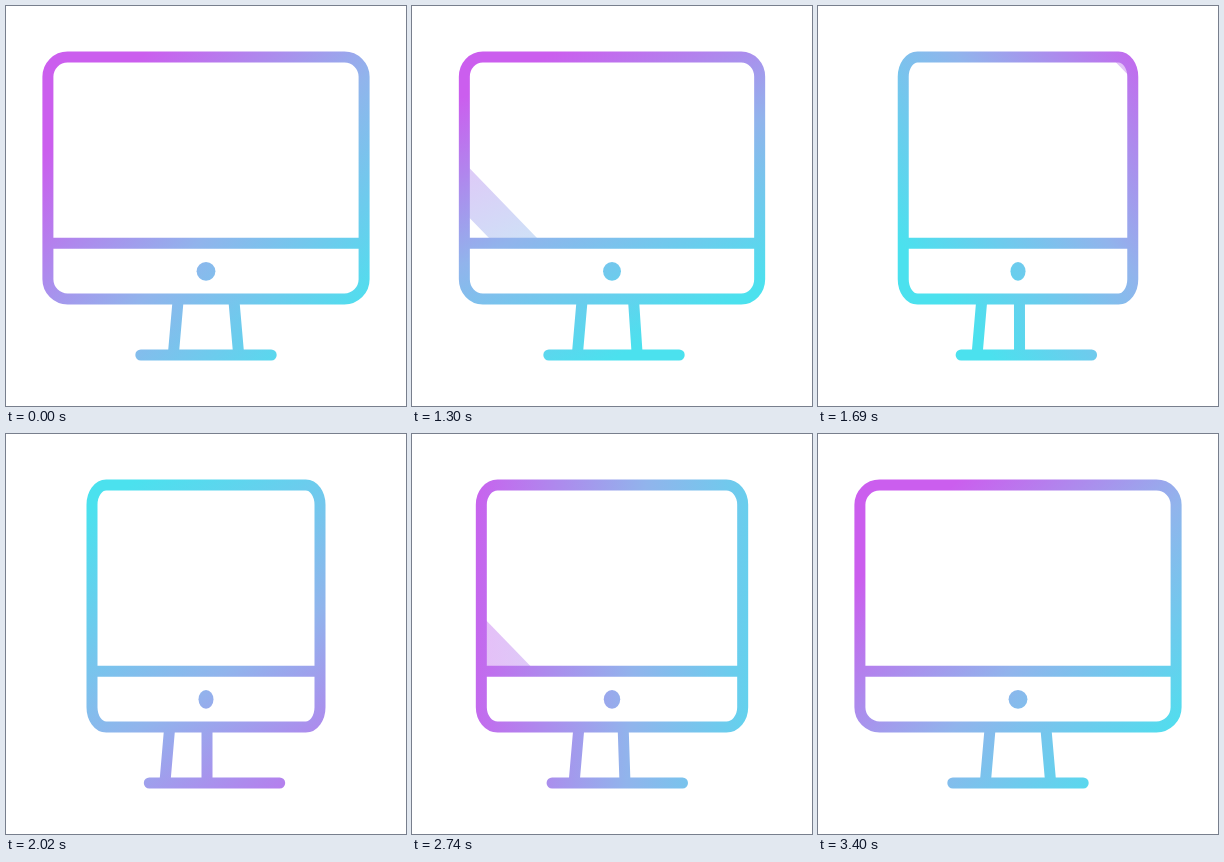
An HTML page for the animation above (3.43 s loop, 400 px wide and 400 px high).

```html
<!DOCTYPE html>
<html lang="en">
<head>
<meta charset="utf-8">
<title>Desktop monitor</title>
<style>
  html, body { margin: 0; width: 100%; height: 100%; overflow: hidden; background: #fff; }
  svg { display: block; width: 100vw; height: 100vh; }
</style>
</head>
<body>
<svg viewBox="0 0 400 400">
  <defs>
    <linearGradient id="tint" gradientUnits="userSpaceOnUse">
      <stop offset="0" stop-color="#cb5eee"/>
      <stop offset=".5" stop-color="#91b4ec"/>
      <stop offset="1" stop-color="#4be1ee"/>
    </linearGradient>
    <clipPath id="screen"><rect id="mask" y="51" height="186" ry="19.7"/></clipPath>
  </defs>
  <path id="gloss" clip-path="url(#screen)" fill="url(#tint)" opacity=".43"/>
  <g fill="none" stroke="url(#tint)" stroke-width="11">
    <rect id="frame" y="51" height="242" ry="19.7"/>
    <path id="lines"/>
    <path id="base" stroke-linecap="round"/>
  </g>
  <ellipse id="dot" cx="200" cy="265.3" ry="9.4" fill="url(#tint)"/>
</svg>
<script>
const LOOP = 3430, STEP = 30, START = 1030;
const el = id => document.getElementById(id);
const set = (id, attrs) => {
  for (const k in attrs) el(id).setAttribute(k, attrs[k]);
};
const mix = (a, b, p) => a + (b - a) * p;

// cubic-bezier(.6, 0, .4, 1)
function ease(x) {
  if (x <= 0) return 0;
  if (x >= 1) return 1;
  let lo = 0, hi = 1, u = 0.5;
  for (let i = 0; i < 24; i++) {
    u = (lo + hi) / 2;
    const v = 1 - u;
    if (1.8 * u * v * v + 1.2 * u * u * v + u * u * u < x) lo = u; else hi = u;
  }
  return u * u * (3 - 2 * u);
}
const span = (t, from, to) => ease((t - from) / (to - from));

// time, angle toward the purple end, value at the centre, length
const KEYS = [
  [1000, 225, 0.38, 345],
  [1510, 277, 0.53, 285],
  [2020, 417, 0.66, 420],
  [2500, 513, 0.47, 355],
  [2920, 560, 0.41, 365],
  [3400, 585, 0.38, 345]
];

function slope(i, c) {
  const a = KEYS[i - 1], b = KEYS[i + 1];
  return a && b ? (b[c] - a[c]) / (b[0] - a[0]) : 0;
}

function track(t, c) {
  const last = KEYS.length - 1;
  if (t <= KEYS[0][0]) return KEYS[0][c];
  if (t >= KEYS[last][0]) return KEYS[last][c];
  let i = 0;
  while (t >= KEYS[i + 1][0]) i++;
  const a = KEYS[i], b = KEYS[i + 1], d = b[0] - a[0];
  const u = (t - a[0]) / d, v = 1 - u;
  return a[c] * v * v * (1 + 2 * u) + b[c] * u * u * (3 - 2 * u)
    + d * u * v * (v * slope(i, c) - u * slope(i + 1, c));
}

function paintTint(t) {
  const a = track(t, 1) * Math.PI / 180, mid = track(t, 2), len = track(t, 3);
  const dx = -Math.cos(a) * len, dy = -Math.sin(a) * len;
  set("tint", {
    x1: 200 - dx * mid, y1: 171 - dy * mid,
    x2: 200 + dx * (1 - mid), y2: 171 + dy * (1 - mid)
  });
}

// Slanted band; l and r are its edges at y = 57
const band = (l, r) => `M${l - 6} 51H${r - 6}L${r + 174} 237H${l + 174}Z`;

function draw(t) {
  const turn = span(t, 1000, 1790) - span(t, 2200, 3400);
  const half = mix(158.1, 114, turn), left = 200 - half;
  const box = { x: left, width: half * 2, rx: 19.7 * half / 158.1 };
  set("frame", box);
  set("mask", box);
  set("dot", { rx: mix(9.4, 7.5, turn) });

  const pole = (top, foot, topTurn, footTurn) =>
    `M${mix(top, topTurn, turn)} 293L${mix(foot, footTurn, turn)} 349`;
  set("lines", {
    d: `M${left} 237.2H${200 + half}`
      + pole(172.2, 167.3, 163.7, 158.9)
      + pole(227.8, 232.7, 201, 201)
  });
  const shift = 8.5 * turn;
  set("base", { d: `M${134.8 + shift} 349H${265.2 + shift}` });

  const first = mix(-430, 290, span(t, 1000, 1945));
  const second = mix(-340, 340, span(t, 2480, 3360));
  set("gloss", {
    d: t < 2200
      ? band(79 + first, 148 + first) + band(232 + first, 280 + first)
      : band(70 + second, 206 + second)
  });
  paintTint(t);
}

function tick(now) {
  const t = now % LOOP;
  draw(t < START ? 0 : START + STEP * Math.floor((t - START) / STEP));
  requestAnimationFrame(tick);
}
draw(0);
requestAnimationFrame(tick);
</script>
</body>
</html>
```
